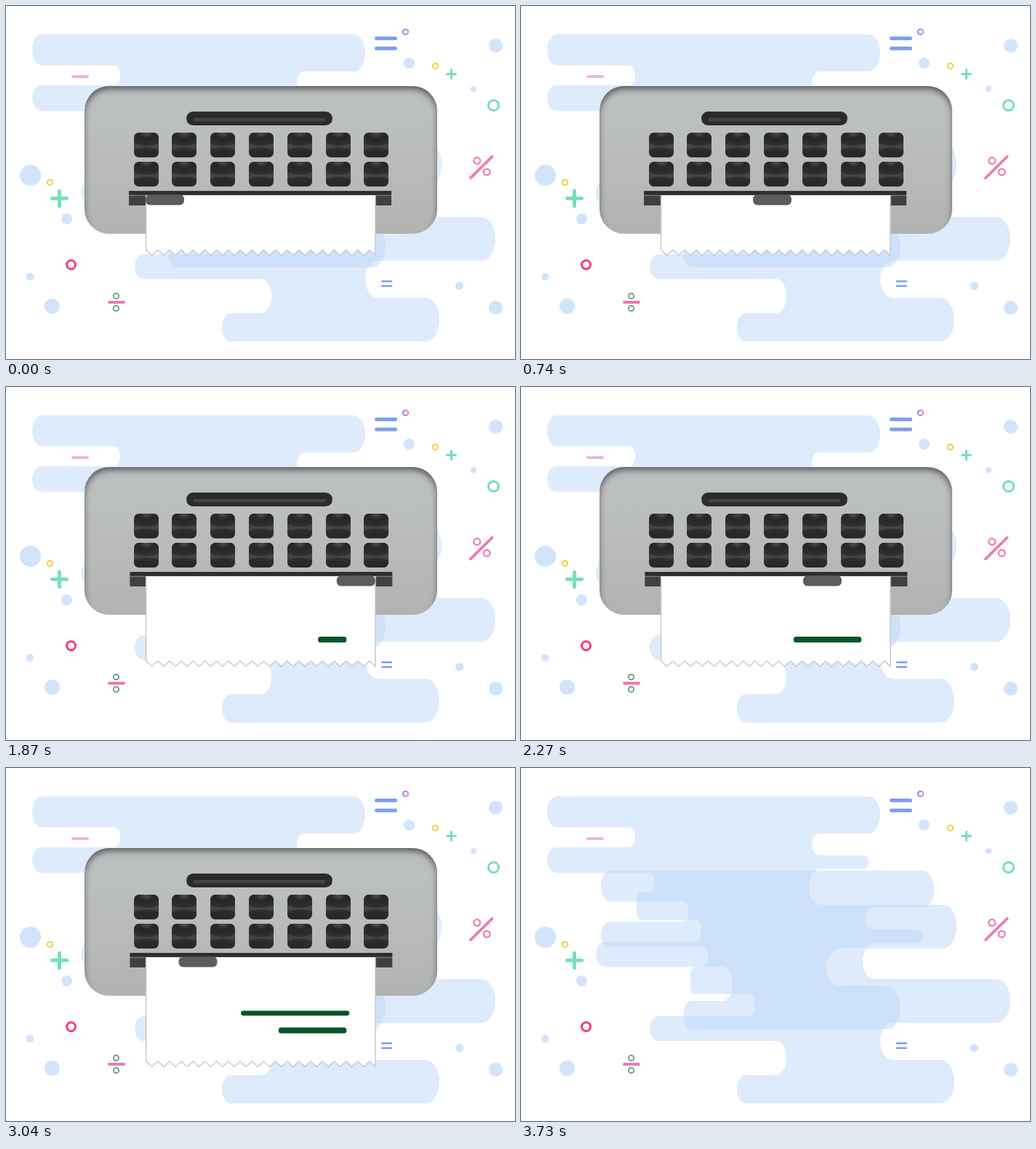
These frames come from a looping animation (700x485 px, 3760 ms). An HTML page:

```html
<!DOCTYPE html>
<html lang="en">
<head>
<meta charset="utf-8">
<title>Receipt printer</title>
<style>
html, body { margin: 0; width: 100%; height: 100%; overflow: hidden; background: #fff; }
svg, div, i { position: absolute; display: block; box-sizing: border-box; }
svg { left: 0; top: 0; }
#printer { left: 0; top: 0; width: 700px; height: 485px; }
.body {
  left: 108px; top: 110px; width: 484.6px; height: 203px; border-radius: 34px;
  background: linear-gradient(#bcbfc0 20%, #b8bab9 60%, #b1b3b1);
  box-shadow:
    inset 0 9px 8px -4px rgba(70, 70, 70, .6),
    inset 7px 5px 7px -5px rgba(80, 80, 80, .42),
    inset -7px 5px 7px -5px rgba(80, 80, 80, .42);
}
.slot {
  left: 247.5px; top: 145px; width: 201.5px; height: 19px; border-radius: 9.5px;
  background: linear-gradient(#2c2c2c, #292929 40%, #2c2c2c 47%, #464646 50%, #424242 66%, #2d2d2d 74%, #292929);
}
.slot::before, .slot::after {
  content: ""; position: absolute; top: 5px; width: 9px; height: 10px; background: #2b2b2b;
}
.slot::before { left: 1px; }
.slot::after { right: 1px; }
.keys i {
  width: 34px; height: 34px; border-radius: 6.5px;
  background:
    radial-gradient(ellipse 10px 8px at 50% 0, #515151, transparent),
    radial-gradient(ellipse 30px 18px at 50% 0, #282828 55%, #303030 97%, transparent),
    radial-gradient(ellipse 30px 14px at 50% 100%, #292929 55%, #2f2f2f 90%, transparent),
    #434343;
}
.bar {
  left: 168.8px; top: 253.5px; width: 361.4px; height: 20.3px;
  background: linear-gradient(#3a3a3a, #2c2c2c 1.5px, #303030 5.4px, #8a8a8a 5.8px, #777 6.6px, #404040 7px);
}

/* Every pose is held, then cut to the next one. */
.bar, .paper, .head, .low, .high, #printer { animation: 3760ms step-end infinite; }
#printer { animation-name: show; }
.bar { animation-name: nudge; }
.paper { animation-name: feed; }
.head { animation-name: head; }
.low { animation-name: low; }
.high { animation-name: high; }

@keyframes show {
  0%, 90.4255% { visibility: visible; }
  89.6277%, 99.2021% { visibility: hidden; }
}
@keyframes nudge {
  0% { transform: none; }
  49.734%, 100% { transform: translateX(1.3px); }
}
@keyframes feed {
  0% { transform: none; }
  49.734% { transform: translateY(41.3px); }
  71.0106%, 100% { transform: translateY(67.8px); }
}
@keyframes head {
  0% { transform: translateX(192px); }
  9.8404% { transform: translateX(229px); }
  19.6809% { transform: translateX(319px); }
  36.4362% { transform: translateX(395px); }
  49.734% { transform: translateX(454.7px); }
  60.3723% { transform: translateX(388px); }
  71.0106% { transform: translateX(319px); }
  80.8511% { transform: translateX(237.5px); }
  89.6277%, 100% { transform: translateX(197.2px); }
}
@keyframes low {
  0% { x: 468px; y: 343px; width: 0; }
  49.734% { x: 429px; y: 343px; width: 39.3px; }
  60.3723% { x: 374.8px; y: 343px; width: 93.5px; }
  71.0106%, 100% { x: 374.8px; y: 356.5px; width: 93.5px; }
}
@keyframes high {
  0% { x: 472px; width: 0; }
  71.0106% { x: 363.8px; width: 108.5px; }
  80.8511%, 100% { x: 323px; width: 149.3px; }
}
</style>
</head>
<body>
<svg width="700" height="485" fill="none" stroke-linecap="round">
  <defs>
    <linearGradient id="duo">
      <stop offset=".2" stop-color="#7b8ff0"/>
      <stop offset=".8" stop-color="#ea7bc4"/>
    </linearGradient>
  </defs>
  <g fill="#bfdaf9" fill-opacity=".53">
    <path class="blob"/>
    <path class="blob" transform="translate(74 102)"/>
  </g>
  <g fill="#d2e4fb">
    <circle cx="33.5" cy="232.5" r="14.6"/>
    <circle cx="83.5" cy="292.5" r="7.6"/>
    <circle cx="33" cy="372" r="5.2"/>
    <circle cx="63.5" cy="412.5" r="10.6"/>
    <circle cx="554.5" cy="78.5" r="7.6"/>
    <circle cx="673.5" cy="54.5" r="9.6"/>
    <circle cx="643" cy="114" r="4.1"/>
    <circle cx="623.5" cy="384.5" r="5.6"/>
    <circle cx="673.5" cy="414.5" r="9.6"/>
  </g>
  <g stroke="#7b9ff3">
    <path stroke-width="5" d="M509.5 44.5h26M509.5 58.3h26"/>
    <path stroke-width="2.4" d="M517 378.2h13M517 384.8h13"/>
  </g>
  <g stroke="#77dfbb">
    <path stroke-width="5" d="M63.5 264.2h20M73.5 254.2v20.5"/>
    <path stroke-width="3" d="M606.5 93.4h12M612.5 87.4v12"/>
    <circle cx="670.5" cy="136.5" r="7.1" stroke-width="3"/>
  </g>
  <g stroke="#f3cf45" stroke-width="2">
    <circle cx="590.5" cy="82.5" r="3.7"/>
    <circle cx="60.5" cy="242.4" r="3.7"/>
  </g>
  <g stroke="#ef79b1">
    <path stroke-width="3.8" d="M639 236.2L668.5 207M142 407h20"/>
    <circle cx="647.8" cy="212.6" r="4.4" stroke-width="2.2"/>
    <circle cx="661.2" cy="228.2" r="4.4" stroke-width="2.2"/>
  </g>
  <g stroke="#6ea57b" stroke-width="2">
    <circle cx="151.5" cy="398.4" r="3.6"/>
    <circle cx="151.5" cy="415.4" r="3.6"/>
  </g>
  <circle cx="89.5" cy="355.5" r="6" stroke="#f73c7a" stroke-width="3"/>
  <circle cx="549.5" cy="35.5" r="3.6" stroke="url(#duo)" stroke-width="2"/>
  <path stroke="#eab4e8" stroke-width="4" d="M92 97h20"/>
</svg>

<div id="printer">
  <div class="body"></div>
  <div class="slot"></div>
  <div class="keys"></div>
  <div class="bar"></div>
  <svg width="700" height="485">
    <clipPath id="mouth"><rect y="260" width="700" height="225"/></clipPath>
    <g clip-path="url(#mouth)">
      <path class="paper" fill="#fff" stroke="#c6c9cb" stroke-width="1.5"/>
    </g>
    <rect class="low" y="343" height="8" rx="3.6" fill="#04562a"/>
    <rect class="high" y="333.4" height="6.8" rx="3.4" fill="#045623"/>
    <path class="head" fill="#5c5c5c" d="M5 259.3H48Q53 260 53 266.5Q53 273.6 45.5 273.6H7.5Q0 273.6 0 266.5Q0 260 5 259.3Z"/>
  </svg>
</div>

<script>
const $ = s => document.querySelector(s);

// Each step: x of the end, corner radius, lower y. Ends and notches alternate.
const right = [[494, 16, 90], [400, 10, 120], [478, 6, 138.5], [396, 15, 188],
  [599, 19, 248], [420, 18, 299], [522, 19, 359]];
const left = [[36, 13, 81.5], [157, 8, 109], [36, 13, 144], [183, 7, 171],
  [159, 6, 208.5], [247, 6, 239], [103, 12, 273], [291, 14, 320], [223, 12, 359]];

function side(steps, dir) {
  let y = 39;
  return steps.map(([x, rx, end], i) => {
    const out = i % 2 ? -dir : dir;
    const ry = Math.min((end - y) / 2, rx * 1.7);
    const sweep = out > 0 ? 1 : 0;
    const flip = dir > 0 ? sweep : 1 - sweep;
    const arc = (px, py) => ({ rx, ry, x: px, y: py, flip });
    const inner = x - out * rx;
    const pts = [{ x: inner, y }, arc(x, y + ry), { x, y: end - ry }, arc(inner, end)];
    y = end;
    return pts;
  }).flat();
}

function trace(pts) {
  return pts.map(p => p.rx
    ? `A${p.rx} ${p.ry} 0 0 ${p.flip} ${p.x} ${p.y}`
    : `L${p.x} ${p.y}`).join('');
}

// Walk the left side upwards: each arc moves to the point that began it.
function reverse(pts) {
  return pts.map((p, i) => {
    const next = pts[i + 1];
    return next && next.rx ? { ...next, x: p.x, y: p.y } : { x: p.x, y: p.y };
  }).reverse();
}

const outline = 'M300 39' + trace(side(right, 1)) + trace(reverse(side(left, -1))) + 'Z';
document.querySelectorAll('.blob').forEach(b => b.setAttribute('d', outline));

const teeth = 39, tooth = 315.4 / teeth;
let edge = 'M192.6 150';
for (let i = 0; i <= teeth; i++) edge += `L${192.6 + i * tooth} ${i % 2 ? 342.6 : 335.2}`;
$('.paper').setAttribute('d', edge + 'V150Z');

for (let i = 0; i < 14; i++) {
  const key = document.createElement('i');
  key.style.left = 175.6 + (i % 7) * 52.8 + 'px';
  key.style.top = (i < 7 ? 173.5 : 214) + 'px';
  $('.keys').append(key);
}
</script>
</body>
</html>
```
